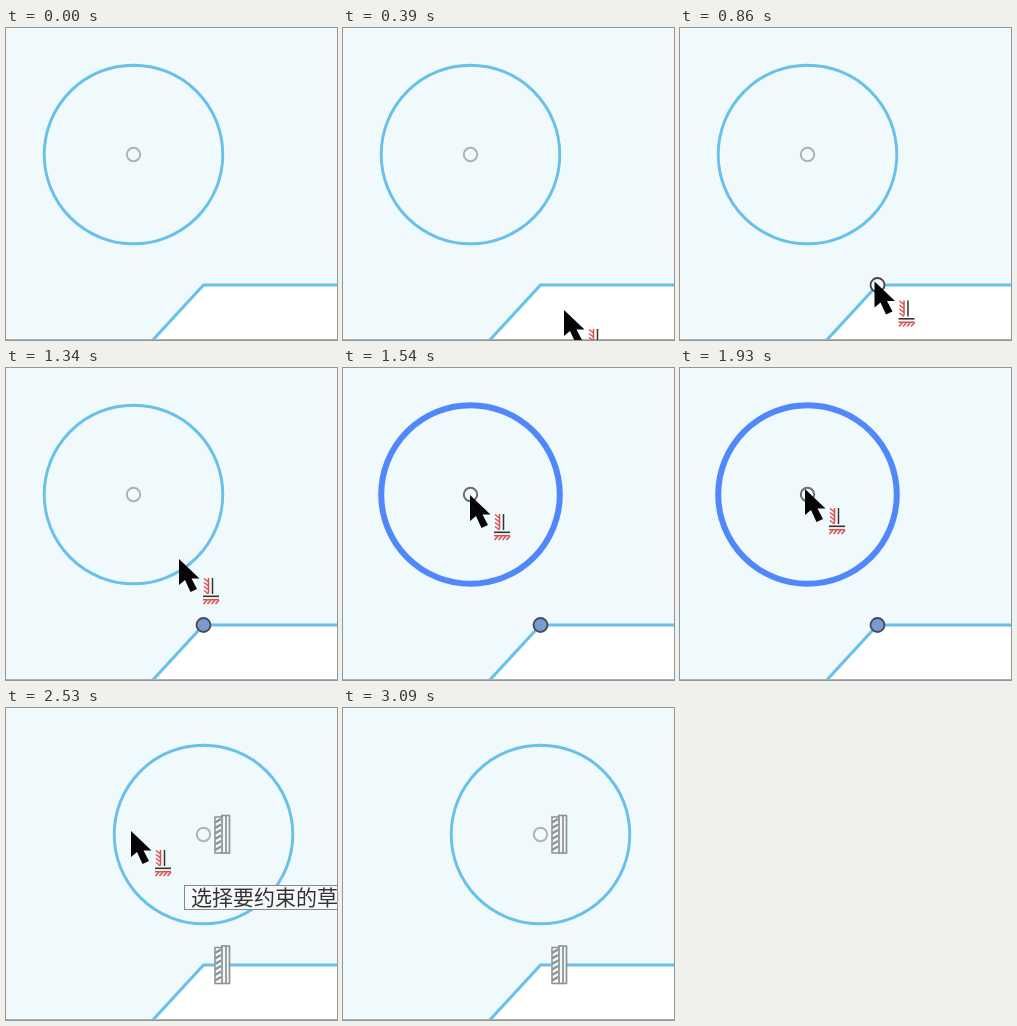
An HTML page with a canvas for the animation above (3820 ms loop, 331 by 312 pixels).

```html
<!DOCTYPE html>
<html lang="zh">
<head>
<meta charset="utf-8">
<style>
  html, body { margin: 0; width: 100%; height: 100%; overflow: hidden; background: #f0f9fc; }
  canvas { display: block; }
</style>
</head>
<body>
<canvas id="stage" width="331" height="312"></canvas>
<script>
const ctx = document.getElementById('stage').getContext('2d');
const LOOP = 3820;
const STEP = 70;
const PAPER = '#f0f9fc', BLUE = '#69c1ea', RED = '#dc4f4b', DARK = '#343236', GRAY = '#8c9395';
const corner = { x: 197.5, y: 257 };

// Turning points of the pointer; it moves straight between them in short jumps.
const pointerPath = [
  { t: 180, x: 249, y: 303 },
  { t: 600, x: 193, y: 261 },
  { t: 860, x: 194.5, y: 253.5 },
  { t: 1000, x: 194.5, y: 253.5 },
  { t: 1340, x: 173, y: 191 },
  { t: 1540, x: 127, y: 127 },
  { t: 1930, x: 125, y: 121 },
  { t: 2190, x: 125, y: 123 },
  { t: 2860, x: 125, y: 123 },
  { t: 3090, x: 340, y: 370 }
];

const between = (t, from, to) => t >= from && t < to;

function pointerAt(t) {
  const next = pointerPath.findIndex(key => key.t > t);
  if (next < 1) return null;
  const a = pointerPath[next - 1], b = pointerPath[next];
  const k = Math.floor((t - a.t) / STEP) * STEP / (b.t - a.t);
  return { x: a.x + (b.x - a.x) * k, y: a.y + (b.y - a.y) * k };
}

function trace(points) {
  ctx.beginPath();
  for (const [x, y] of points) ctx.lineTo(x, y);
}

function line(color, width, ...points) {
  trace(points);
  ctx.strokeStyle = color;
  ctx.lineWidth = width;
  ctx.stroke();
}

function ring(x, y, r, color, width, fill) {
  ctx.beginPath();
  ctx.arc(x, y, r, 0, Math.PI * 2);
  if (fill) {
    ctx.fillStyle = fill;
    ctx.fill();
  }
  ctx.strokeStyle = color;
  ctx.lineWidth = width;
  ctx.stroke();
}

function at(x, y, paint) {
  ctx.save();
  ctx.translate(x, y);
  paint();
  ctx.restore();
}

function drawBase() {
  ctx.fillStyle = PAPER;
  ctx.fillRect(0, 0, 331, 312);
  const edge = [[145, 314], [corner.x, corner.y], [335, corner.y]];
  trace([...edge, [335, 314]]);
  ctx.fillStyle = '#fff';
  ctx.fill();
  line(BLUE, 3.1, ...edge);
  line('#a9afb2', 1, [0, 311.5], [331, 311.5]);
}

function drawGlyph() {
  ctx.fillStyle = '#f4f7f8';
  ctx.fillRect(1, 1, 16, 38);
  for (const x of [9, 13, 16.5]) line(GRAY, 1.7, [x, 1], [x, 39]);
  for (const y of [1, 38.5]) line(GRAY, 1.6, [8, y], [17, y]);
  line(GRAY, 1.5, [9, 2.5], [2, 2.5], [2, 38.5], [9, 38.5]);
  for (let y = 8; y < 39; y += 5.5) line(GRAY, 2.2, [2, y], [8, y - 3.5]);
}

function drawPointer() {
  trace([[0, 0], [0, 26], [6, 21], [11.5, 33], [18, 30], [12.5, 19.5], [20.5, 19.5]]);
  ctx.fillStyle = '#050505';
  ctx.fill();

  line(RED, 1.5, [29.5, 19], [29.5, 34]);
  for (let d = 0; d < 16; d += 4) {
    line(RED, 1.5, [25, 19.5 + d], [29.5, 23 + d]);
    line(RED, 1.5, [24.5 + d, 45], [28 + d, 41]);
  }
  line(DARK, 1.5, [33.5, 19], [33.5, 35]);
  line(DARK, 1.6, [24, 37.3], [40, 37.3]);
  line(RED, 1.5, [24, 40.7], [40, 40.7]);
}

function drawTooltip() {
  ctx.fillStyle = '#f7f8fa';
  ctx.fillRect(178, 177, 160, 25);
  ctx.strokeStyle = '#85898c';
  ctx.lineWidth = 1;
  ctx.strokeRect(178.5, 177.5, 160, 24);
  ctx.fillStyle = '#333';
  ctx.font = '300 21px "Noto Sans CJK SC", "Noto Sans CJK", sans-serif';
  ctx.fillText('选择要约束的草图', 185, 197);
}

function draw(t) {
  const aligned = t >= 2190;
  const hovered = between(t, 1540, 2190);
  const center = { x: aligned ? corner.x : 127.5, y: 126.5 };

  drawBase();
  ring(center.x, center.y, 89.3, hovered ? '#5087fb' : BLUE, hovered ? 6 : 2.9);
  ring(center.x, center.y, 6.7, hovered ? '#6a6d70' : '#abb3b5', 2);

  if (between(t, 530, 1060)) ring(corner.x, corner.y, 7, '#444548', 1.8, '#f8fbfd');
  if (between(t, 1060, 2190)) ring(corner.x, corner.y, 7, '#454a5c', 1.8, '#7c9ad2');
  if (t >= 2260) {
    for (const y of [center.y, corner.y]) at(207, y - 20, drawGlyph);
  }
  if (between(t, 2530, 2930)) drawTooltip();

  const tip = pointerAt(t);
  if (tip) at(tip.x, tip.y, drawPointer);
}

const begin = performance.now();
function frame() {
  draw((performance.now() - begin) % LOOP);
  requestAnimationFrame(frame);
}
frame();
</script>
</body>
</html>
```
